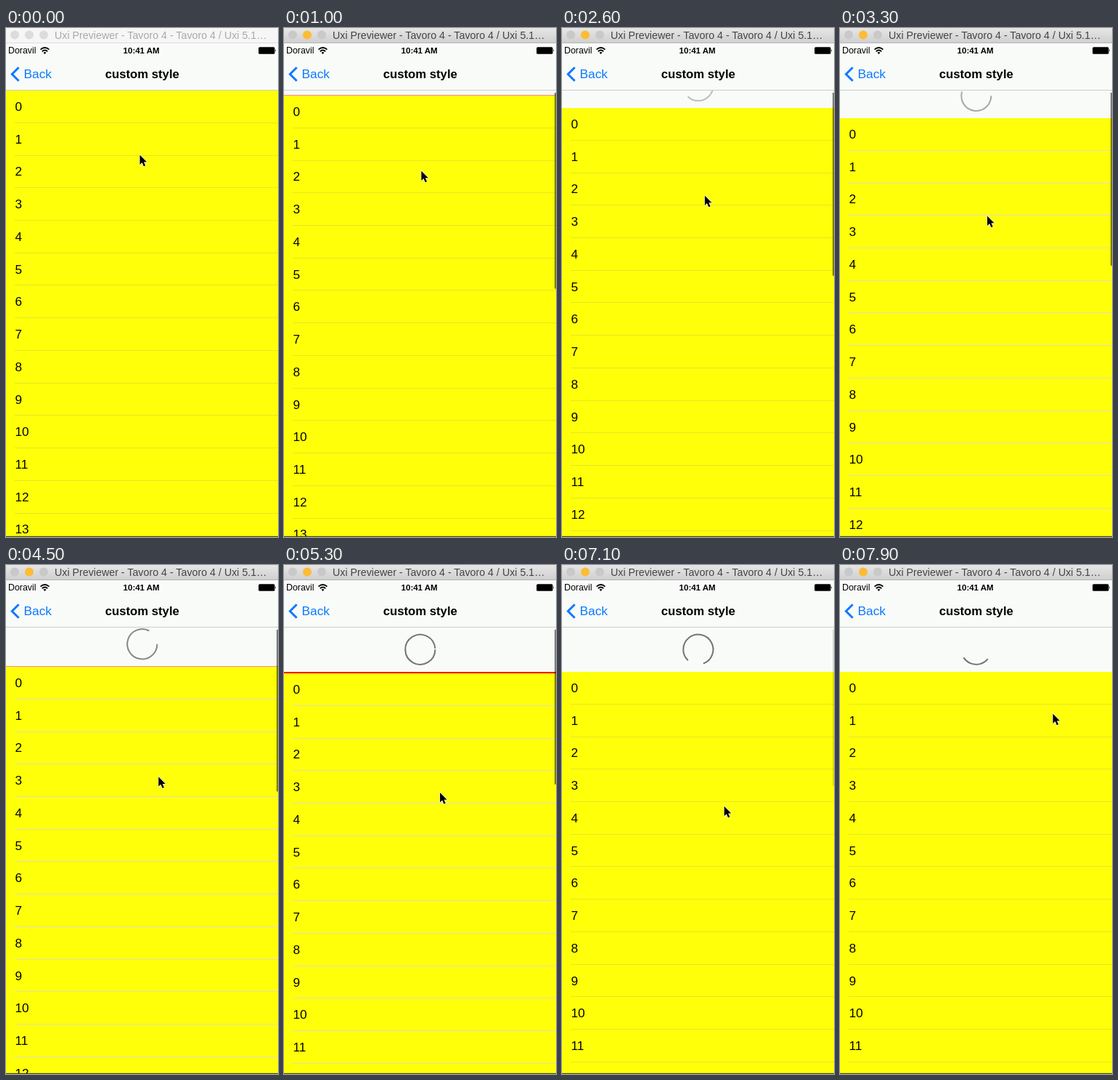
Write an HTML page that moves like this. It is 375 by 700 pixels and loops after 8000 ms.

```html
<!DOCTYPE html>
<html lang="en">
<head>
<meta charset="utf-8">
<title>Pull to refresh</title>
<style>
  html, body { margin: 0; width: 100%; height: 100%; overflow: hidden; background: #f9fbf9; }
  svg { display: block; width: 375px; height: 700px; }
  text { font-family: "Liberation Sans", Arial, sans-serif; white-space: pre; }
  .bold { font-weight: 700; }
</style>
</head>
<body>
<svg viewBox="0 0 375 700">
  <defs>
    <linearGradient id="shade" x1="0" y1="0" x2="0" y2="1">
      <stop offset="0" stop-color="#e6e6e6"/>
      <stop offset="1" stop-color="#d0d0d0"/>
    </linearGradient>
  </defs>

  <rect y="86" width="375" height="614" fill="#ff0008"/>
  <rect id="header" y="86" width="375" fill="#f9fbf9"/>
  <path id="ring" fill="none" stroke="#737373" stroke-width="2"/>

  <g id="list">
    <rect width="375" height="620" fill="#ffff0a"/>
  </g>
  <rect id="bar" x="373" y="89" width="2" fill="#000" fill-opacity=".5"/>
  <rect y="698.8" width="375" height="1.2" fill="#4a4a1c"/>

  <rect y="20" width="375" height="66" fill="#f9fbf9"/>
  <rect y="85" width="375" height="1" fill="#ccceca"/>
  <text x="3" y="35" font-size="12.4">Doravil</text>
  <g fill="none" stroke="#000" stroke-width="1.9">
    <path d="M47.6 29.6Q53.5 24.4 59.4 29.6"/>
    <path d="M49.8 32.2Q53.5 28.9 57.2 32.2"/>
    <path d="M51.5 33.8Q53.5 32.2 55.5 33.8L53.5 36Z" fill="#000" stroke="none"/>
  </g>
  <text class="bold" x="161.6" y="35" font-size="11.5">10:41 AM</text>
  <rect x="348.2" y="26.2" width="22.3" height="9.6" rx="1.6"/>
  <path d="M371.2 29.3q1.8 1.7 0 3.4z"/>
  <path d="M17.6 54.2L8.3 63.5L17.6 72.8" fill="none" stroke="#0b7aff" stroke-width="3"/>
  <text x="24.4" y="69.2" font-size="17.4" fill="#0b7aff">Back</text>
  <text class="bold" x="136.8" y="69" font-size="16.7">custom style</text>

  <rect id="window" width="375" height="20"/>
  <rect id="edge" y="20" width="375" height="1"/>
  <g id="lights"></g>
  <text id="caption" x="67" y="14.8" font-size="14.25">Uxi Previewer - Tavoro 4 - Tavoro 4 / Uxi 5.1…</text>

  <path id="cursor" d="M0 0V13.4L3.1 10.6L5.4 15.8L7.7 14.8L5.5 9.7H9.6Z" stroke="#fff"
    stroke-width="1.2" stroke-linejoin="round" paint-order="stroke"/>
</svg>
<script>
const LOOP = 8000, STEP = 100;
const PRESS = 400, RELEASE = 6500, SPIN = 6700, LEAVE = 7000;
const TOP = 86, VIEW = 614, HEADER = 61, ROW = 44.73, RADIUS = 20.6, DRAG = 163;

// How far the pointer has been dragged down: [time, pixels].
const dragKeys = [[PRESS, 0], [1600, 44], [2600, 56], [3300, 84], [6200, DRAG]];

const $ = id => document.getElementById(id);
const set = (el, attrs) => {
  for (const key in attrs) el.setAttribute(key, attrs[key]);
  return el;
};
const add = (parent, tag, attrs) =>
  parent.appendChild(set(document.createElementNS("http://www.w3.org/2000/svg", tag), attrs));

const mix = (a, b, k) => a + (b - a) * k;
const part = (t, from, length) => Math.min(1, Math.max(0, (t - from) / length));
const ease = k => k * k * (3 - 2 * k);

function dragged(t) {
  const i = dragKeys.findIndex(key => key[0] > t);
  if (i < 0) return DRAG;
  if (i === 0) return 0;
  const [t0, a] = dragKeys[i - 1], [t1, b] = dragKeys[i];
  return mix(a, b, part(t, t0, t1 - t0));
}

// The scroll view resists the drag more the further it goes.
function pulled(t) {
  const distance = Math.max(0, dragged(t) - 10);
  const stretch = VIEW * (1 - 1 / (distance * 0.55 / VIEW + 1));
  return mix(stretch, HEADER, ease(part(t, RELEASE, 400)));
}

const lines = [];
for (let i = 0; i < 14; i++) {
  add($("list"), "text", { x: 12.4, y: 28 + ROW * i, "font-size": 17.2 }).textContent = i;
  lines.push(add($("list"), "rect", {
    x: 12, y: Math.round(ROW * (i + 1) - 0.9), width: 363, height: 1, "shape-rendering": "crispEdges"
  }));
}
const lights = [12, 32, 52].map(cx => add($("lights"), "circle", { cx, cy: 9.4, r: 6 }));

function arc(cy, from, length) {
  const point = deg => {
    const a = deg * Math.PI / 180;
    return `${187.8 + RADIUS * Math.cos(a)} ${cy + RADIUS * Math.sin(a)}`;
  };
  const r = `A${RADIUS} ${RADIUS} 0 0 1 `;
  return `M${point(from)}` + [1, 2, 3].map(n => r + point(from + length * n / 3)).join("");
}

function drawWindow(active) {
  set($("window"), { fill: active ? "url(#shade)" : "#f6f6f6" });
  set($("edge"), { fill: active ? "#b4b4b4" : "#dcdcdc" });
  set($("caption"), { fill: active ? "#444" : "#a9a9a9" });
  lights.forEach((light, i) => {
    set(light, { fill: !active ? "#dcdcdc" : i === 1 ? "#fdbc34" : "#c9c9c9" });
  });
}

function drawRing(t, cy) {
  const progress = Math.min(1, pulled(t - 250) / HEADER);
  const spin = Math.max(0, t - SPIN) / 1200;
  const length = spin ? 234 + 126 * Math.cos(Math.PI * spin) : 360 * progress;
  set($("ring"), {
    d: arc(cy, 399 * spin, length),
    opacity: progress && 0.12 + 0.88 * progress
  });
}

function drawCursor(t) {
  const drag = dragged(t), away = ease(part(t, LEAVE, 800));
  const x = mix(184.5 + 36 * drag / DRAG, 293.5, away);
  const y = mix(174.5 + drag, 204.5, away);
  set($("cursor"), { transform: `translate(${x} ${y})` });
}

function draw(t) {
  const offset = pulled(t);
  const shown = Math.min(offset, HEADER);
  drawWindow(t >= PRESS);
  set($("header"), { height: shown });
  set($("list"), { transform: `translate(0 ${TOP + Math.round(offset)})` });
  set($("bar"), {
    height: 276 - offset,
    opacity: part(t, PRESS, 200) - part(t, RELEASE + 300, 400)
  });
  const pale = t >= 2800 && t < 5400;
  lines.forEach(line => set(line, { fill: pale ? "#dedebc" : "#e6e622" }));
  drawRing(t, TOP + shown - 30.8);
  drawCursor(t);
}

const start = performance.now();
function tick() {
  const t = (performance.now() - start) % LOOP;
  draw(Math.floor(t / STEP) * STEP);
  requestAnimationFrame(tick);
}
tick();
</script>
</body>
</html>
```
